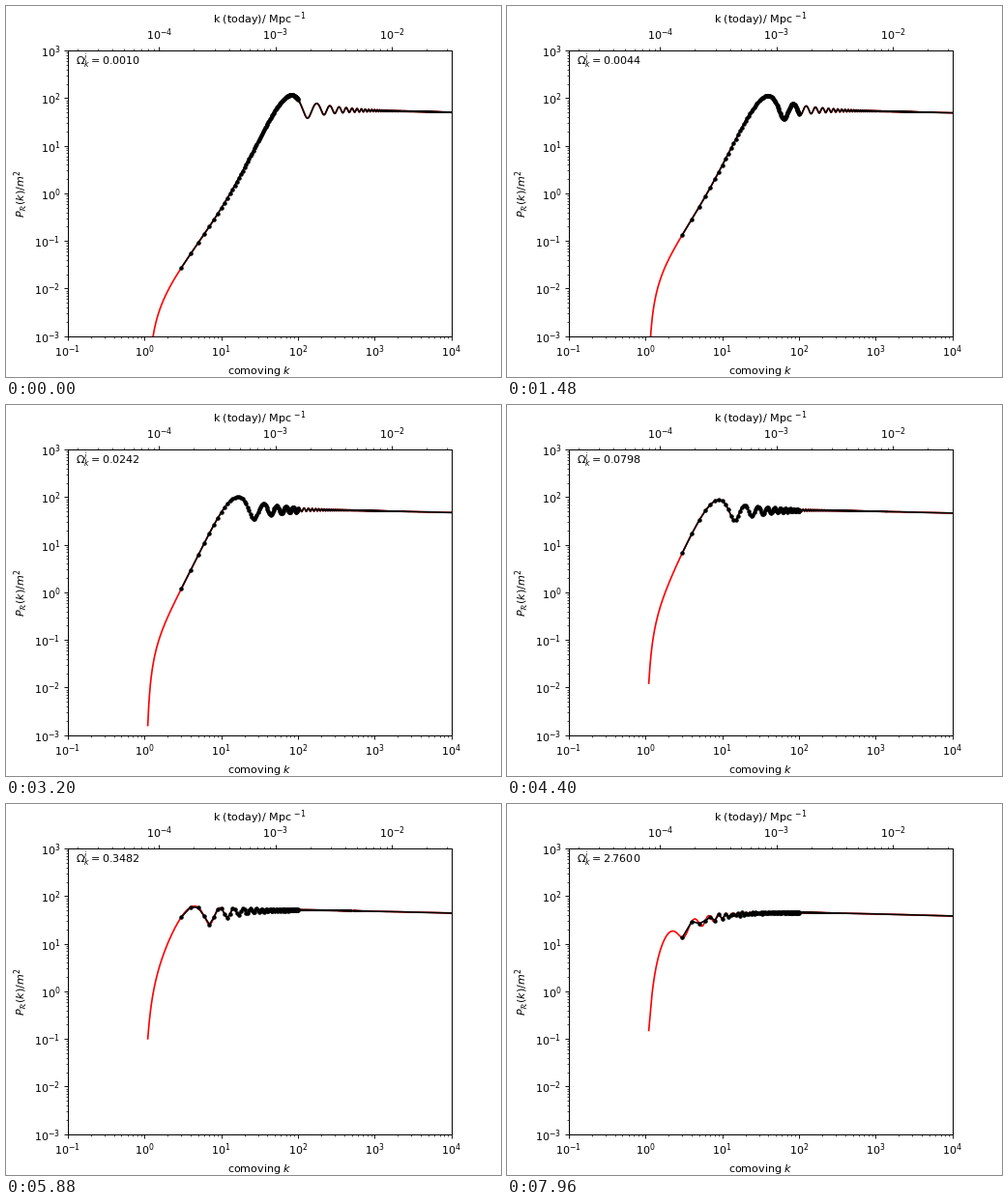
Write a matplotlib script that moves like this. It is 512 by 384 pixels and loops after 8 s.

```python
import numpy as np
import matplotlib.pyplot as plt
from matplotlib.animation import FuncAnimation
from matplotlib.ticker import NullFormatter

FRAMES = 200
INTERVAL = 40
PHI0 = 16.0        # field at the start of inflation, quadratic potential, m = 1
K_MIN, K_MAX = 1.1, 1e4

omega = 0.001 * 2760 ** (np.arange(FRAMES) / (FRAMES - 1))


def solve_spectra(omega, points=260):
    """Integrate closed-universe curvature modes for all omega at once."""
    om = omega[:, None]
    p = np.full_like(om, -PHI0 / np.sqrt(2))
    hub = np.sqrt(p**2 / (2 * (1 + om)))
    a0 = 1 / (hub * np.sqrt(om))
    ah0 = a0 * hub
    k_top = 30 * ah0 + 10
    k = K_MIN + (k_top - K_MIN) * np.linspace(0, 1, points) ** 2.5
    d = (k + 3) * (k - 1)

    def deriv(n, state):
        phi, p, hub, r, s = state
        w = 1 / (a0 * np.exp(n) * hub) ** 2
        e = p**2 / (2 * hub**2)
        dlnh = w - e
        dlnz = -2 - phi / (hub * p) - dlnh
        inv = 1 / (d + e)
        friction = dlnh + ((1 + 2 * dlnz) * d + 3 * e) * inv
        mass = w * (d * (d + (1 + e - 2 * dlnz)) - e) * inv
        return (p / hub, -3 * p - phi / hub, hub * dlnh,
                s, -friction * s - mass * r)

    def shifted(state, slope, h):
        return [x + h * dx for x, dx in zip(state, slope)]

    phi = np.full_like(om, PHI0)
    z0 = a0 * np.abs(p) / hub
    dlnz0 = -1 - phi / (hub * p)
    state = [phi, p, hub, np.ones_like(k) + 0j, dlnz0 - 1j * k / ah0]

    grid = 1.007 ** np.arange(299) - 1
    tau = np.zeros_like(om)
    for n, h in zip(grid[:-1], np.diff(grid)):
        k1 = deriv(n, state)
        k2 = deriv(n + h / 2, shifted(state, k1, h / 2))
        k3 = deriv(n + h / 2, shifted(state, k2, h / 2))
        k4 = deriv(n + h, shifted(state, k3, h))
        before = 1 / (a0 * np.exp(n) * state[2])
        state = [x + h / 6 * (b + 2 * c + 2 * f + g)
                 for x, b, c, f, g in zip(state, k1, k2, k3, k4)]
        after = 1 / (a0 * np.exp(n + h) * state[2])
        tau += h * (before + after) / 2
    tau += after

    power = k**2 / (4 * np.pi**2 * z0**2) * np.abs(state[3]) ** 2
    return k, power, tau[:, 0], (2 * dlnz0 * ah0)[:, 0]


k_grid, p_grid, tau, kick = solve_spectra(omega)


def tail_shape(k, i, k_ref, n_ref):
    """Slow-roll tilt with decaying ripples, valid well inside the horizon."""
    phase = 2 * (k + 1) * tau[i]
    ripple = 1 - (np.cos(phase) + kick[i] * np.sin(phase)) / k
    tilt = (1 - np.log(k / k_ref) / n_ref) ** 2
    return ripple * tilt * (k / (k + 1)) ** 3


def spectrum(k, i):
    kg, pg = k_grid[i], p_grid[i]
    k_ref, end = kg[-1], slice(-36, None)
    n_ref = np.sqrt(96 * np.pi**2 * pg[end].mean()) / 4
    scale = np.mean(pg[end] / tail_shape(kg[end], i, k_ref, n_ref))
    low = np.exp(np.interp(np.log(k), np.log(kg), np.log(pg)))
    high = scale * tail_shape(np.maximum(k, k_ref), i, k_ref, n_ref)
    return np.where(k < k_ref, low, high)


k_fine = np.geomspace(K_MIN, K_MAX, 2000)
k_int = np.arange(3, 101)
k_line = np.concatenate([k_int, np.geomspace(100, K_MAX, 1000)[1:]])

fig, ax = plt.subplots(figsize=(6.4, 4.8), dpi=80)
ax.set(xscale="log", yscale="log", xlim=(1e-1, 1e4), ylim=(1e-3, 1e3))
ax.set_xlabel("comoving $k$")
ax.set_ylabel(r"$P_{\mathcal{R}}(k)/m^2$")

top = ax.twiny()
top.set_xscale("log")
top.set_xlim(1.648e-5, 0.0326)
top.set_xlabel("k (today)/ Mpc $^{-1}$")
for axis in (ax.xaxis, ax.yaxis, top.xaxis):
    axis.set_minor_formatter(NullFormatter())

red, = ax.plot([], [], "r-")
black, = ax.plot([], [], "k-")
dots, = ax.plot([], [], "k.")
label = ax.text(0.02, 0.95, "", transform=ax.transAxes)


def update(i):
    red.set_data(k_fine, spectrum(k_fine, i))
    p_line = spectrum(k_line, i)
    black.set_data(k_line, p_line)
    dots.set_data(k_int, p_line[:len(k_int)])
    label.set_text(rf"$\Omega_k^i={omega[i]:.4f}$")
    return red, black, dots, label


anim = FuncAnimation(fig, update, frames=FRAMES, interval=INTERVAL,
                     init_func=lambda: update(0), repeat=True, repeat_delay=0)
plt.show()
```
